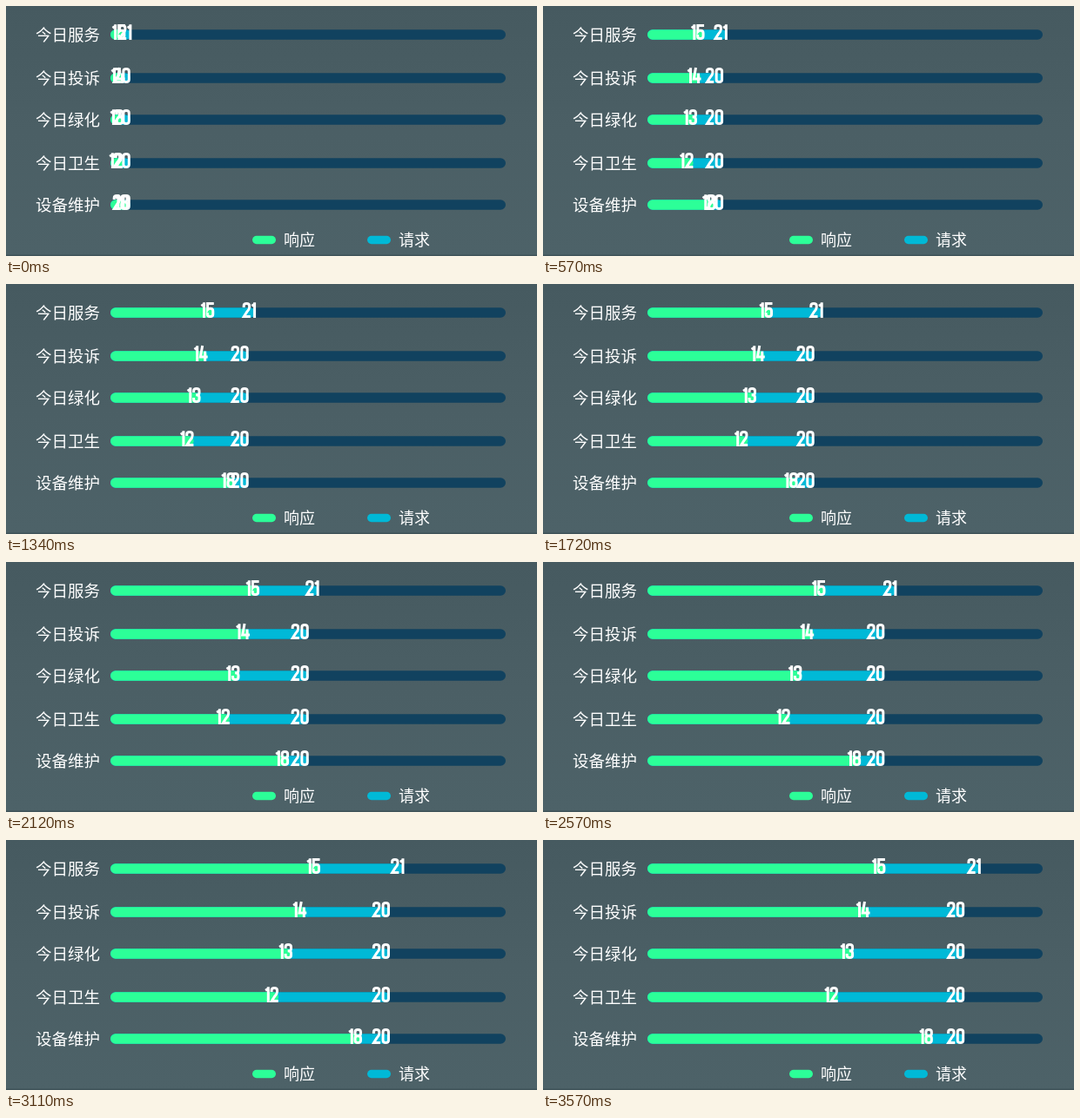
Write an HTML page with a canvas that moves like this. It is 610 px wide and 288 px high and loops after 3880 ms.

```html
<!DOCTYPE html>
<html lang="zh-CN">
<head>
<meta charset="utf-8">
<title>今日服务</title>
<style>
  html, body { margin: 0; width: 100%; height: 100%; overflow: hidden; background: #4a5e64; }
  canvas { display: block; width: 610px; height: 288px; }
</style>
</head>
<body>
<canvas id="stage"></canvas>
<script>
const WIDTH = 610, HEIGHT = 288, LOOP = 3880;
const LEFT = 120, TRACK = 454, MAX = 25, THICK = 11.5;
const GREEN = '#2cff98', CYAN = '#00b9d7', NAVY = '#11425f';
const FONT = '"Noto Sans CJK SC", "Noto Sans CJK", "Noto Sans", sans-serif';

const rows = [
  { name: '今日服务', done: 15, asked: 21, y: 33 },
  { name: '今日投诉', done: 14, asked: 20, y: 83 },
  { name: '今日绿化', done: 13, asked: 20, y: 131 },
  { name: '今日卫生', done: 12, asked: 20, y: 181 },
  { name: '设备维护', done: 18, asked: 20, y: 229 },
];

// Condensed numerals in a 10 x 18 box, built from shared arcs.
const over = 'Q1.8 1.6 5 1.6T8.2 4';
const under = 'V14Q8.2 16.4 5 16.4T1.8 14';
const hook = 'M1.8 6V4' + over;
const digits = {
  0: 'M1.8 4' + over + under + 'Z',
  1: 'M.3 4.2L3.4 2.2M3.5 .2V18',
  2: hook + 'V6Q8.2 8 5.5 11L2 16.4H9.5',
  3: hook + 'V6.4Q8.2 8.8 4.4 8.8Q8.2 8.8 8.2 11.2' + under + 'V12',
  4: 'M4 0L1.7 13H10M7 6.5V18',
  5: 'M9.2 1.6H2V8.6Q3 7.2 5 7.2Q8.2 7.2 8.2 10' + under + 'V12',
  8: 'M5 8.8Q1.8 8.8 1.8 6V4' + over + 'V6Q8.2 8.8 5 8.8Q8.2 8.8 8.2 11.4' + under + 'V11.4Q1.8 8.8 5 8.8',
};
const glyphs = Object.fromEntries(
  Object.entries(digits).map(([digit, path]) => [digit, new Path2D(path)]));
const advance = digit => digit === '1' ? 5.5 : 10.7;

const canvas = document.getElementById('stage');
const ctx = canvas.getContext('2d');
const ratio = window.devicePixelRatio || 1;
canvas.width = WIDTH * ratio;
canvas.height = HEIGHT * ratio;
ctx.scale(ratio, ratio);

const backdrop = ctx.createLinearGradient(0, 0, 0, HEIGHT);
backdrop.addColorStop(0, '#465a60');
backdrop.addColorStop(0.5, '#4b5f65');
backdrop.addColorStop(1, '#4d6268');

// Step number and share of the final bar length.
const pace = [
  [-1, .06], [0, .125], [5, .237], [7, .268], [10, .335], [14, .416],
  [20, .525], [28, .684], [31, .747], [35, .823], [38, .881], [42, .968], [44, 1],
];
const FIRST = 190, LAST = 3570, STEPS = 44;

function progress(time) {
  if (time < FIRST) return pace[0][1];
  const exact = (time - FIRST) / (LAST - FIRST) * STEPS;
  const step = Math.min(STEPS, Math.floor(exact + 0.25));
  const next = Math.max(1, pace.findIndex(([at]) => at >= step));
  const [a, from] = pace[next - 1], [b, to] = pace[next];
  return from + (to - from) * (step - a) / (b - a);
}

function pill(x, y, width, height, color) {
  ctx.fillStyle = color;
  ctx.beginPath();
  ctx.roundRect(x, y - height / 2, width, height, Math.min(width, height) / 2);
  ctx.fill();
}

function text(label, x, y, size) {
  ctx.font = `${size}px ${FONT}`;
  ctx.fillStyle = '#fff';
  ctx.fillText(label, x, y + size * 0.38);
}

function number(value, right, y) {
  const chars = [...String(value)];
  let x = right - chars.reduce((sum, digit) => sum + advance(digit), 0);
  ctx.strokeStyle = '#fff';
  ctx.lineWidth = 3;
  for (const digit of chars) {
    ctx.save();
    ctx.translate(x, y);
    ctx.stroke(glyphs[digit]);
    ctx.restore();
    x += advance(digit);
  }
}

function draw(time) {
  ctx.fillStyle = backdrop;
  ctx.fillRect(0, 0, WIDTH, HEIGHT);
  ctx.fillStyle = '#3f5359';
  ctx.fillRect(0, 286.5, WIDTH, 1.5);

  const unit = TRACK / MAX * progress(time);
  for (const { name, done, asked, y } of rows) {
    text(name, 34, y, 18.5);
    pill(LEFT, y, TRACK, THICK, NAVY);
    pill(LEFT, y, asked * unit + 1, THICK, CYAN);
    pill(LEFT, y, done * unit + 1, THICK, GREEN);
  }
  for (const { done, asked, y } of rows) {
    number(done, LEFT + done * unit + 2, y - 12);
    number(asked, LEFT + asked * unit + 2, y - 12);
  }

  pill(283, 269.5, 27, 9.5, GREEN);
  text('响应', 319, 269.5, 18);
  pill(415, 269.5, 27, 9.5, CYAN);
  text('请求', 451, 269.5, 18);
}

const start = performance.now();
function tick() {
  draw(Math.max(0, performance.now() - start) % LOOP);
  requestAnimationFrame(tick);
}
tick();
</script>
</body>
</html>
```
